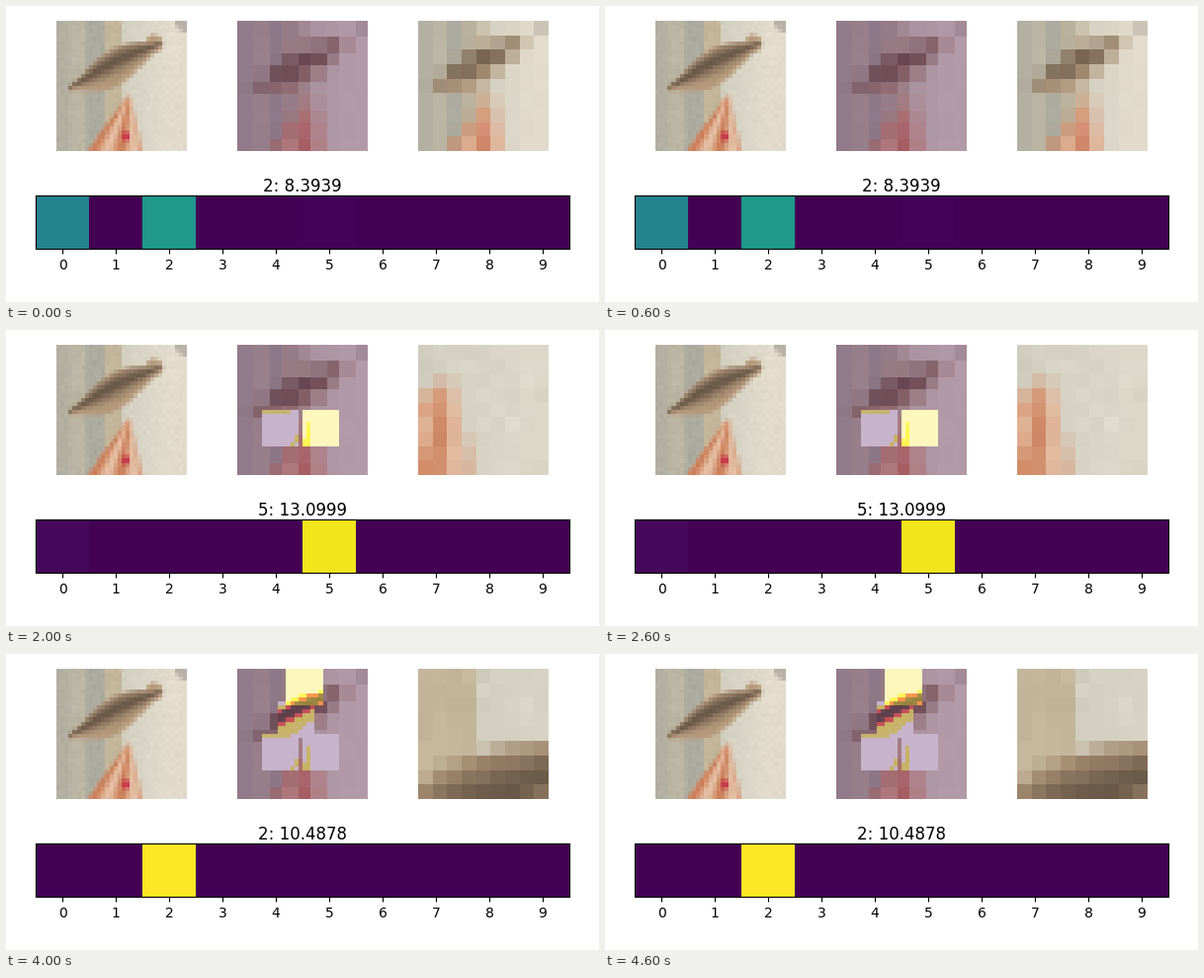
A matplotlib script that plays this animation: 600 px wide and 300 px high, repeating every 5000 ms.

```python
import matplotlib.pyplot as plt
import numpy as np
from matplotlib.animation import FuncAnimation

N, G, SS = 32, 9, 8  # picture side, glimpse side, supersampling

GLIMPSES = [(6, 16), (16, 16), (10, 8), (12, 0)]
SCORES = [
    ("2: 8.3939", {0: .45, 2: .54, 5: .01}),
    ("2: 16.8940", {2: 1}),
    ("5: 13.0999", {0: .02, 5: .98}),
    ("2: 12.2186", {2: 1}),
    ("2: 10.4878", {2: 1}),
]


def mix(a, b, t):
    """Blend two colours by an array of weights."""
    t = np.clip(t, 0, 1)[..., None]
    return (1 - t) * np.array(a) + t * np.array(b)


def paint():
    """Build the N x N picture from a wall, a perch and a bird."""
    n = N * SS
    y, x = (np.mgrid[:n, :n] + .5) / SS

    # wall: warm strip, grey strip, tan post, then a light gradient
    img = mix((210, 207, 192), (227, 220, 205), (x - 16) / 12)
    img[x < 16] = (195, 182, 155)
    img[x < 12] = (172, 171, 160)
    img[x < 7.2] = (188, 182, 164)
    img[x < 3.5] = (179, 176, 162)
    img[np.hypot(x - N, y) < 3] = (185, 178, 165)

    # perch: a cone whose stripes meet at its tip
    depth = y - 18.6
    left, right = 17.2 - .72 * depth, 18.4 + .2 * depth
    q = (x - left) / (right - left)
    stripes = mix((229, 193, 166), (203, 126, 88), .5 + .5 * np.cos(4 * np.pi * (q - .1)))
    cone = (depth > 0) & (q > 0) & (q < 1)
    img[cone] = stripes[cone]
    img[np.hypot(x - 17, y - 28.4) < 1.1] = (200, 60, 75)

    # bird: a tapered body, dark along the back, with a round head
    s = np.clip((x - 3) / 23, 0, 1)
    swell = .6 + 4 * np.sin(np.pi * s) ** 1.3
    offset = y - (16.7 - 11.2 * s)
    t = offset / np.where(offset > 0, 1.12 * swell, swell)
    shade = 1 - .43 * np.exp(-((t + .25) / .55) ** 2)
    plumage = np.array((184, 156, 126)) * shade[..., None]
    body = (abs(t) < 1) & (x > 3) & (x < 26)
    head = np.hypot(x - 24, y - 5.7) < 2.2
    img[body | head] = plumage[body | head]

    img = img.reshape(N, SS, N, SS, 3).mean(axis=(1, 3))
    img += np.random.default_rng(4).normal(0, 2, (N, N, 1))
    return np.clip(img / 255, 0, 1)


def shrink(img):
    """Area-average the picture down to G x G."""
    big = img.repeat(G, axis=0).repeat(G, axis=1)
    return big.reshape(G, N, G, N, 3).mean(axis=(1, 3))


def window(pos):
    col, row = pos
    return slice(row, row + G), slice(col, col + G)


def add_panel(k, img):
    ax = fig.add_subplot(2, 3, k)
    ax.axis("off")
    return ax, ax.imshow(img, interpolation="nearest")


photo = paint()
coarse = shrink(photo)
near = np.arange(N) * G // N
blurred = coarse[near][:, near]
sharp = np.where(photo < .5, photo, 1)  # bright channels saturate

fig = plt.figure(figsize=(6, 3), dpi=100, facecolor="white")
fig.subplots_adjust(left=.05, right=.95, bottom=.05, top=.95, wspace=.05, hspace=.05)
heat = dict(cmap="viridis", vmin=0, vmax=1, interpolation="nearest")

add_panel(1, photo)
canvas_ax, canvas = add_panel(2, blurred)
focus = canvas_ax.imshow(np.zeros((N, N)), alpha=.3, **heat)
_, view = add_panel(3, coarse)

bar_ax = fig.add_subplot(2, 1, 2)
bar = bar_ax.imshow(np.zeros((1, 10)), **heat)
bar_ax.set_xticks(range(10))
bar_ax.set_yticks([])
title = bar_ax.set_title("", pad=1.5)


def update(step):
    seen = blurred.copy()
    mask = np.zeros((N, N))
    for pos in GLIMPSES[:step]:
        seen[window(pos)] = sharp[window(pos)]
    if step:
        current = window(GLIMPSES[step - 1])
        mask[current] = 1
        view.set_data(photo[current])
    else:
        view.set_data(coarse)
    canvas.set_data(seen)
    focus.set_data(mask)

    label, probs = SCORES[step]
    bar.set_data([[probs.get(k, 0) for k in range(10)]])
    title.set_text(label)
    return canvas, focus, view, bar, title


anim = FuncAnimation(fig, update, frames=len(SCORES), interval=1000, repeat=True)
plt.show()
```
